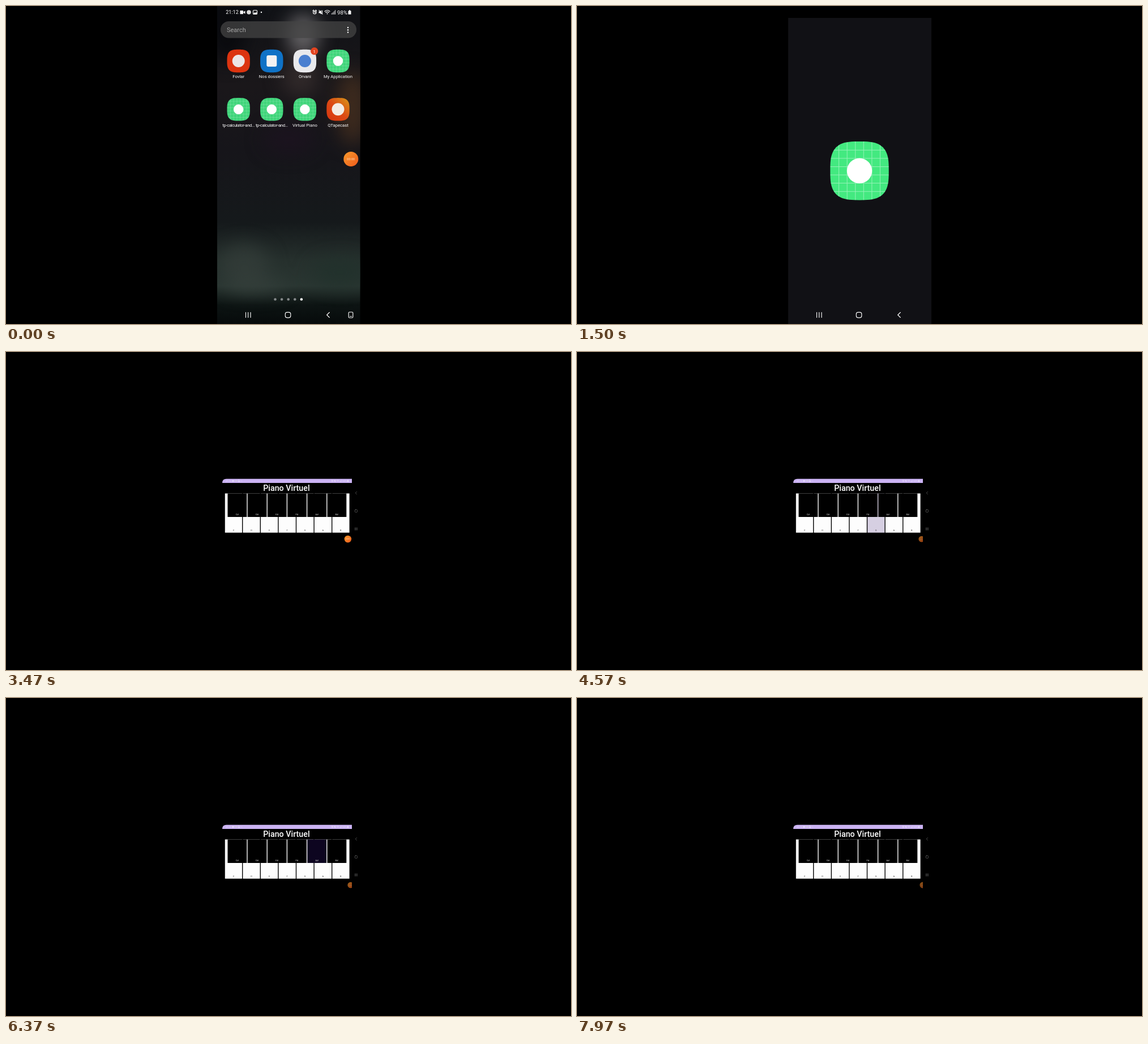
These frames come from a looping animation (998x561 px, 8000 ms). An HTML page:

```html
<!DOCTYPE html>
<html lang="fr">
<head>
<meta charset="utf-8">
<title>Piano Virtuel</title>
<style>
  html, body { margin: 0; width: 100%; height: 100%; overflow: hidden; background: #000; }
  svg { display: block; width: 100vw; height: 100vh; }
  text { font-family: Roboto, "Open Sans", sans-serif; fill: #fff; }
  .line { fill: none; stroke: #fff; stroke-width: 1.15; stroke-linecap: round; stroke-linejoin: round; }
  .mid { text-anchor: middle; }
</style>
</head>
<body>
<svg id="stage" viewBox="0 0 998 561">
  <defs>
    <clipPath id="phone"><rect x="373" width="252.5" height="561"/></clipPath>
    <clipPath id="app"><rect x="382" y="223" width="229" height="114"/></clipPath>
    <filter id="soft" filterUnits="userSpaceOnUse" x="300" y="-80" width="400" height="720" color-interpolation-filters="sRGB">
      <feGaussianBlur stdDeviation="16"/>
    </filter>
    <linearGradient id="orange" x2="1" y2="1">
      <stop stop-color="#f89a2c"/><stop offset="1" stop-color="#ee5a1c"/>
    </linearGradient>
    <linearGradient id="tape" x2="1" y1="1" y2="0">
      <stop stop-color="#d8340f"/><stop offset=".5" stop-color="#dc4a14"/><stop offset="1" stop-color="#d99a18"/>
    </linearGradient>
    <linearGradient id="wall" x2="0" y2="1">
      <stop stop-color="#101216"/><stop offset=".25" stop-color="#1a171a"/><stop offset=".45" stop-color="#16151a"/>
      <stop offset=".68" stop-color="#15191b"/><stop offset=".8" stop-color="#26302d"/>
      <stop offset=".88" stop-color="#2a3632"/><stop offset=".94" stop-color="#0d1413"/><stop offset="1" stop-color="#060a0b"/>
    </linearGradient>
    <g id="statusLeft">
      <text x="388.300" y="14.400" font-size="9">21:12</text>
      <path d="M413.500 8h5.500v6.200h-5.500zM419.500 10.200l3-1.800v5.400l-3-1.800z" fill="#fff"/>
      <circle cx="429" cy="11" r="3.800" fill="#ddd"/>
      <rect x="436.500" y="7.500" width="7" height="7" rx="1.300" class="line"/>
      <path d="M437 14l2-3 1.500 1.500 1.500-2 1.500 3.500z" fill="#fff"/>
      <circle cx="451" cy="11" r="1.200" fill="#fff"/>
    </g>
    <g id="statusRight">
      <circle cx="545.300" cy="11.300" r="2.700" class="line"/>
      <path d="M542 8.500l1.500-1.500M548.500 8.500L547 7M545.300 9.800v1.700h1.200" class="line"/>
      <path d="M552.500 9.500h2l2.500-2v7l-2.500-2h-2z" fill="#fff"/>
      <path d="M553 7.500l6 7M558.500 8v5" class="line"/>
      <path d="M563 9.500q4.500-4 9 0M564.700 11.500q2.800-2.400 5.600 0" class="line"/>
      <circle cx="567.500" cy="13.500" r="1" fill="#fff"/>
      <path d="M575.500 14.500v-1.500M577.500 14.500v-3M579.500 14.500v-5M581.500 14.500v-7" class="line" opacity=".8"/>
      <text x="585" y="14.500" font-size="9.700">98%</text>
      <path d="M604.500 8.500h1.500v-1.200h2v1.200h1.500v6.200h-5z" fill="#fff"/>
    </g>
    <g id="navKeys" class="line">
      <path d="M423.500 540.500v9M427.700 540.500v9M432 540.500v9M571.300 540.500l-4.600 4.500 4.600 4.500"/>
      <rect x="493.300" y="540.300" width="9.500" height="9.500" rx="3"/>
    </g>
    <g id="navSide" class="line">
      <path d="M619.500 246.500l-2.300 2.200 2.300 2.200M616.500 310v4.200M618.400 310v4.200M620.300 310v4.200" stroke-width=".7"/>
      <rect x="616.200" y="278.200" width="4.400" height="4.400" rx="1.300" stroke-width=".7"/>
    </g>
  </defs>
  <rect width="998" height="561"/>
  <g id="portrait" clip-path="url(#phone)">
    <g id="home">
      <rect x="373" width="253" height="561" fill="url(#wall)"/>
      <g id="blobs" filter="url(#soft)"></g>
      <rect x="379" y="27" width="240" height="29.500" rx="14.700" fill="#454545" fill-opacity=".75"/>
      <text x="390" y="46" font-size="11" style="fill:#a5a5a5">Search</text>
      <g fill="#fff">
        <circle cx="604" cy="38" r="1.200"/><circle cx="604" cy="42.200" r="1.200"/><circle cx="604" cy="46.400" r="1.200"/>
      </g>
      <g id="icons"></g>
      <circle cx="544.700" cy="79.700" r="6.600" fill="#e2431f"/>
      <text x="544.700" y="82.500" font-size="7.500" class="mid">1</text>
      <g id="pages"></g>
      <g id="statusTop"><use href="#statusLeft"/><use href="#statusRight"/></g>
      <g id="dockIcon"><rect x="605.200" y="540" width="7.600" height="10" rx="1.500" class="line"/><path d="M607.500 547.500h3" class="line"/></g>
    </g>
    <g id="launch">
      <rect x="373" y="21" width="253" height="540" fill="#111115"/>
      <g id="bigTile"></g>
    </g>
    <rect id="topCover" x="373" width="253" height="21"/>
    <use href="#navKeys"/>
  </g>
  <g id="landscape">
    <g id="splash">
      <rect x="382" y="223.500" width="243.300" height="113.500" fill="#131318"/>
      <g opacity=".8">
        <use href="#statusLeft" transform="translate(388 227) scale(.45) translate(-388 -11)"/>
        <use href="#statusRight" transform="translate(576 227) scale(.45) translate(-545 -11)"/>
      </g>
      <g id="smallTile"></g>
      <use href="#navSide" opacity=".7"/>
    </g>
    <g id="piano">
      <rect x="382" y="223" width="244" height="115"/>
      <path d="M382 231q0-7.300 7.500-7.300H611V231z" fill="#cbb3f4"/>
      <g opacity=".6">
        <use href="#statusLeft" transform="translate(388 227.300) scale(.45) translate(-388 -11)"/>
        <use href="#statusRight" transform="translate(576 227.300) scale(.45) translate(-545 -11)"/>
      </g>
      <text x="495.400" y="245.300" font-size="14.300" font-weight="500" class="mid">Piano Virtuel</text>
      <g id="keys"></g>
      <use href="#navSide" opacity=".42"/>
    </g>
  </g>
  <g id="bubbleClip"><g id="bubble">
    <circle r="13" fill="url(#orange)"/>
    <text id="timer" y="2" font-size="5.600" class="mid" style="fill:#ffe0c0">00:00</text>
  </g></g>
</svg>
<script>
const LOOP = 8000;
const $ = id => document.getElementById(id);

function add(parent, tag, attrs, label) {
  const el = document.createElementNS('http://www.w3.org/2000/svg', tag);
  for (const name in attrs) el.setAttribute(name, attrs[name]);
  if (label) el.textContent = label;
  return parent.appendChild(el);
}

// Rounded launcher shape: a superellipse of radius r.
const POWER = 3.1;
function squircle(cx, cy, r) {
  const bend = v => Math.sign(v) * Math.pow(Math.abs(v), 2 / POWER);
  const points = Array.from({ length: 96 }, (_, i) => {
    const a = i / 48 * Math.PI;
    return (cx + r * bend(Math.cos(a))).toFixed(2) + ' ' + (cy + r * bend(Math.sin(a))).toFixed(2);
  });
  return 'M' + points.join('L') + 'Z';
}

function tile(parent, cx, cy, r, fill) {
  add(parent, 'path', { d: squircle(cx, cy, r), fill });
}

function gridTile(parent, cx, cy, r, fill) {
  tile(parent, cx, cy, r, fill);
  let d = '';
  for (let i = -2.5; i <= 2.5; i++) {
    const off = i * r * .282;
    const reach = r * Math.pow(1 - Math.pow(Math.abs(off) / r, POWER), 1 / POWER);
    d += `M${cx + off} ${cy - reach}v${2 * reach}M${cx - reach} ${cy + off}h${2 * reach}`;
  }
  add(parent, 'path', { d, fill: 'none', stroke: '#fff', 'stroke-opacity': .42, 'stroke-width': r * .02 });
  add(parent, 'circle', { cx, cy, r: r * .43, fill: '#fff' });
}

// Wallpaper: x, y, rx, ry, colour
[
  [525, 50, 28, 36, '#757375'], [390, 30, 35, 70, '#08090c'], [520, 125, 32, 35, '#352d2d'],
  [612, 180, 26, 65, '#46301f'], [500, 235, 45, 25, '#1d1320'],
  [420, 455, 45, 35, '#333c39'], [440, 495, 55, 10, '#39443f'], [590, 470, 50, 25, '#22322c']
].forEach(([cx, cy, rx, ry, fill]) => add($('blobs'), 'ellipse', { cx, cy, rx, ry, fill, opacity: .85 }));

// Home screen: label, tile colour, shape on it
const GREEN = '#3fd57a';
[
  ['Fovlar', '#dc3410', 'circle', '#ece6e6'], ['Nos dossiers', '#0f72c6', 'square', '#f2f2f2'],
  ['Orvani', '#e9e9ec', 'circle', '#4a7fd0'], ['My Application', GREEN],
  ['tp-calculator-and...', GREEN], ['tp-calculator-and...', GREEN],
  ['Virtual Piano', GREEN], ['QTapecast', 'url(#tape)', 'circle', '#f4ece4']
].forEach(([label, fill, shape, ink], i) => {
  const cx = 410.700 + i % 4 * 58.600, cy = i < 4 ? 97 : 182.300, icons = $('icons');
  if (!shape) gridTile(icons, cx, cy, 20.200, fill);
  else tile(icons, cx, cy, 20.200, fill);
  if (shape === 'circle') add(icons, 'circle', { cx, cy, r: 11, fill: ink });
  if (shape === 'square') add(icons, 'rect', { x: cx - 9, y: cy - 10, width: 18, height: 20, rx: 3, fill: ink });
  add(icons, 'text', {
    x: cx, y: cy + 30.200, 'font-size': 7.700, class: 'mid',
    'letter-spacing': label.length > 15 ? -.35 : 0
  }, label);
});

for (let i = 0; i < 5; i++) {
  add($('pages'), 'circle', { cx: 475.500 + i * 11.600, cy: 517.500, r: 2.300, fill: i < 4 ? '#85898a' : '#fff' });
}

gridTile($('bigTile'), 499, 290.700, 51.700, '#43e980');
gridTile($('smallTile'), 503.600, 280.500, 23.300, '#43e980');

// Piano keys
const keys = {};
function pianoKey(name, x, width, height, colors, center, base, ink) {
  const rect = add($('keys'), 'rect', { x, y: 249.500, width, height, fill: colors[0] });
  add($('keys'), 'text', { x: center, y: base, 'font-size': 4, class: 'mid', style: 'fill:' + ink }, name);
  keys[name] = { rect, colors };
}
[...'CDEFGAB'].forEach((name, i) =>
  pianoKey(name, 386.800 + i * 31.600, 30.200, 69.200, ['#fdfdfd', '#d6cfe2'], 402 + i * 31.550, 315.500, '#444'));
['C#', 'D#', 'E#', 'F#', 'A#', 'B#'].forEach((name, i) =>
  pianoKey(name, 391.500 + i * 35.200, 33.800, 41.500, ['#000', '#0d0520'], 408.300 + i * 35.200, 288.300, '#ddd'));

// Notes played: name, start time
const PRESS = 150;
const notes = [
  ['C', 3500], ['D', 3760], ['E', 4010], ['F', 4260], ['G', 4510], ['A', 4770], ['B', 5030],
  ['C#', 5290], ['D#', 5540], ['E#', 5800], ['F#', 6050], ['A#', 6310], ['B#', 6570],
  ['C', 6910], ['D', 7260], ['E', 7640]
];

// Bubble: time, x, y, scale, opacity
const bubblePath = [
  [0, 609.300, 270, 1, 1], [450, 609.300, 270, 1, 1], [700, 619.500, 270, .83, .6], [1699, 619.500, 270, .83, .6],
  [1700, 603.900, 330, .48, 1], [3650, 603.900, 330, .48, 1], [3900, 608.600, 330, .4, .63],
  [7650, 608.600, 330, .4, .63], [7850, 611, 330, .43, .54], [LOOP, 611, 330, .43, .54]
];

const clamp = v => Math.min(1, Math.max(0, v));
const ease = v => v * v * (3 - 2 * v);
const ramp = (t, from, to) => ease(clamp((t - from) / (to - from)));
const mix = (a, b, k) => a + (b - a) * k;
const show = (id, on) => $(id).setAttribute('display', on ? 'inline' : 'none');
const fade = (id, value) => $(id).setAttribute('opacity', value);

function drawBubble(t) {
  const i = bubblePath.findIndex(step => t < step[0]);
  const a = bubblePath[i - 1], b = bubblePath[i], k = ramp(t, a[0], b[0]);
  const [x, y, scale, opacity] = [1, 2, 3, 4].map(n => mix(a[n], b[n], k));
  $('bubble').setAttribute('transform', `translate(${x} ${y}) scale(${scale})`);
  fade('bubble', opacity);
  $('timer').textContent = '00:0' + Math.floor(t / 1000);
  $('bubbleClip').setAttribute('clip-path', t < 2640 ? 'url(#phone)' : 'url(#app)');
  show('bubbleClip', t < 1050 || t >= 1700);
}

function draw(t) {
  const sideways = t >= 1700;
  show('portrait', !sideways);
  show('landscape', sideways);

  fade('statusTop', mix(1, .62, ramp(t, 350, 700)));
  fade('dockIcon', mix(1, .38, ramp(t, 350, 700)));

  const grow = ramp(t, 1050, 1330);
  show('launch', t >= 1050);
  show('topCover', grow === 1);
  const scale = mix(.16, 1, grow);
  $('launch').setAttribute('transform',
    `translate(${mix(527.900, 499, grow)} ${mix(182.300, 290.700, grow)}) scale(${scale}) translate(-499 -290.700)`);
  fade('launch', clamp((t - 1050) / 100));

  fade('piano', ramp(t, 2570, 2740));
  const playing = notes.find(([, start]) => t >= start && t < start + PRESS);
  for (const name in keys) {
    const { rect, colors } = keys[name];
    rect.setAttribute('fill', colors[playing && playing[0] === name ? 1 : 0]);
  }
  drawBubble(t);
}

const begin = performance.now();
function tick() {
  draw((performance.now() - begin) % LOOP);
  requestAnimationFrame(tick);
}
tick();
</script>
</body>
</html>
```
